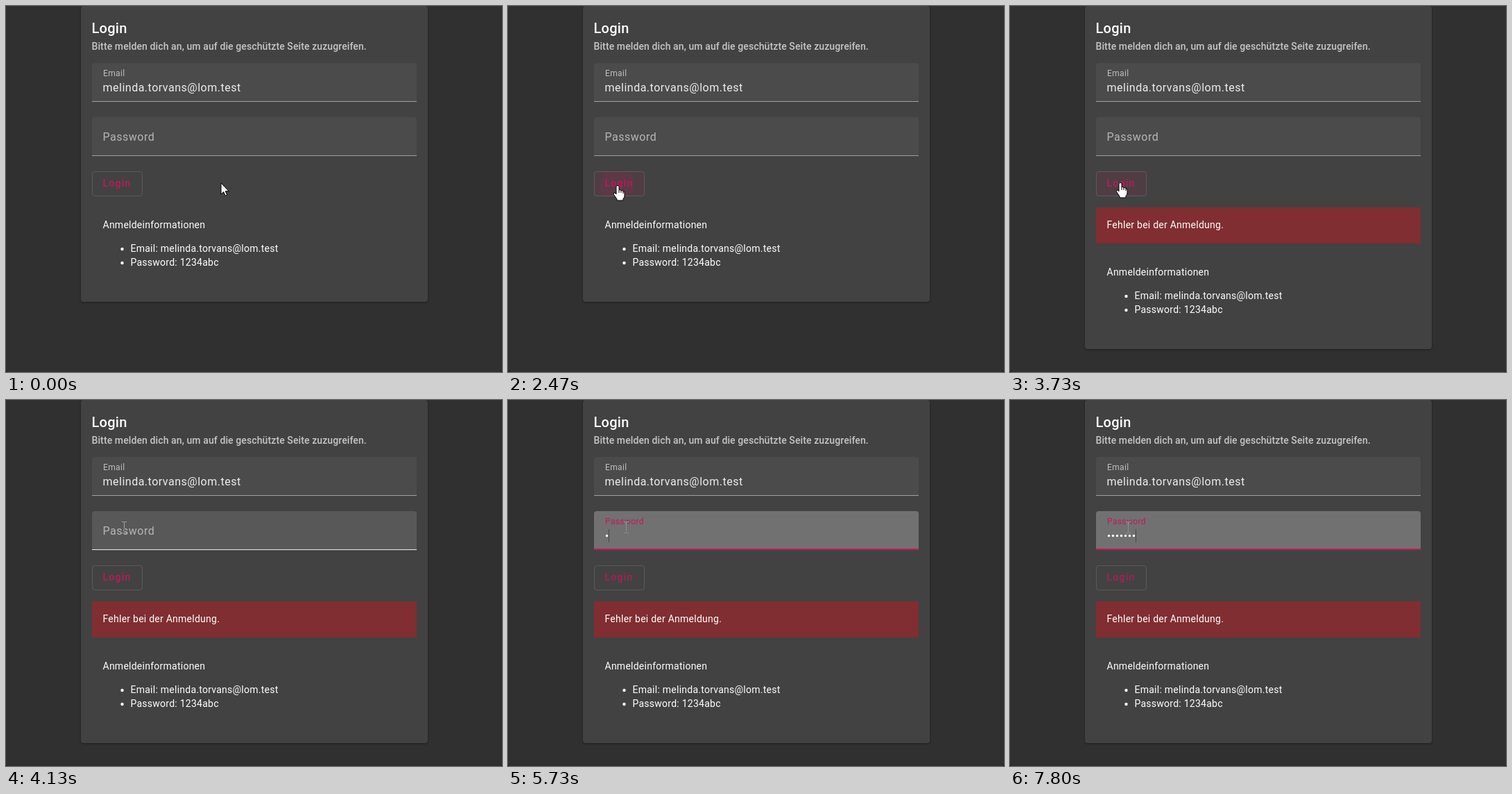
These frames come from a looping animation (715 px wide and 527 px high, 8000 ms). An HTML page with a canvas:

```html
<!DOCTYPE html>
<html lang="de">
<head>
<meta charset="utf-8">
<title>Login</title>
<style>
  html, body { margin: 0; width: 100%; height: 100%; overflow: hidden; background: #303030; }
  canvas { display: block; }
</style>
</head>
<body>
<canvas id="stage" width="715" height="527"></canvas>
<script>
const ctx = document.getElementById('stage').getContext('2d', { alpha: false });
const LOOP = 8000;
const EMAIL = 'melinda.torvans@lom.test';
const PINK = '#c2185b';
const KEY_TIMES = [5730, 5930, 6130, 6400, 7000, 7470, 7800];
const FIELD_X = 124, FIELD_W = 468;

const ARROW = new Path2D('M0 0V16L3.7 12.6L6.2 18.2L8.7 17.1L6.3 11.7H11.3Z');
const HAND = new Path2D('M-2 1.5Q0-1 2 1.5V7Q4 5.5 5 8Q7 6.5 8 9Q10 8 10 11V15Q10 18 8 19.5V22H-1V20L-5.5 13.5Q-6.5 10.5-4 11L-2 13Z');
const KNUCKLES = new Path2D('M2 7V11M5 8V11M8 9V12');

const clamp = v => Math.max(0, Math.min(1, v));
const ease = v => { v = clamp(v); return v * v * (3 - 2 * v); };
const lerp = (a, b, p) => a + (b - a) * p;
const white = alpha => `rgba(255,255,255,${alpha})`;

function rect(x, y, w, h, color) {
  ctx.fillStyle = color;
  ctx.fillRect(x, y, w, h);
}

function rounded(x, y, w, h, radii) {
  ctx.beginPath();
  ctx.roundRect(x, y, w, h, radii);
}

function dot(x, y, r, color) {
  ctx.fillStyle = color;
  ctx.beginPath();
  ctx.arc(x, y, r, 0, Math.PI * 2);
  ctx.fill();
}

function text(str, x, y, size, { color = '#fff', weight = 400, spacing = 0.25 } = {}) {
  ctx.font = `${weight} ${size}px Roboto, sans-serif`;
  ctx.letterSpacing = spacing + 'px';
  ctx.fillStyle = color;
  ctx.fillText(str, x, y);
}

// The picture advances at 15 steps per second.
const stepTime = t => Math.round(Math.floor((t + 5) * 0.015) / 0.015 / 10) * 10;

function pointerAt(t) {
  const toButton = ease((t - 663) / 537);
  const toField = ease((t - 3663) / 467);
  const x = lerp(lerp(310, 158, toButton), 170, toField);
  const y = lerp(lerp(254.5, 258, toButton), 183, toField);
  const onButton = x >= 124 && x < 197 && y >= 238 && y < 274;
  const onField = y >= 160 && y < 216;
  return { x: Math.round(x), y: Math.round(y), onButton, onField };
}

function drawCard(height) {
  ctx.save();
  ctx.shadowColor = 'rgba(0,0,0,.4)';
  ctx.shadowBlur = 3;
  ctx.shadowOffsetY = 1;
  ctx.fillStyle = '#424242';
  rounded(108, 0, 500, height, 4);
  ctx.fill();
  ctx.restore();
  text('Login', 123.5, 39, 20, { weight: 500 });
  text('Bitte melden dich an, um auf die geschützte Seite zuzugreifen.', 123.5, 63, 14,
    { weight: 500, color: white(0.7), spacing: 0.1 });
}

function drawFieldBox(y, fill, line) {
  ctx.fillStyle = fill;
  rounded(FIELD_X, y, FIELD_W, 56, [4, 4, 0, 0]);
  ctx.fill();
  rect(FIELD_X, y + 55, FIELD_W, 1, line);
}

function drawEmailField() {
  drawFieldBox(82, '#4b4b4b', '#a0a0a0');
  text('Email', 140, 101, 12, { color: white(0.64), spacing: 0.375 });
  text(EMAIL, 139.5, 123, 16, { color: white(0.9), spacing: 0.5 });
}

function drawPasswordField(t, hover) {
  const focused = t >= 4470;
  const typed = KEY_TIMES.filter(k => t >= k).length;
  const p = ease((t - 4470) / 150);
  drawFieldBox(160, focused ? '#717171' : hover ? '#585858' : '#4b4b4b',
    focused ? '#c4c4c4' : hover ? '#eeeeee' : '#a0a0a0');

  if (p > 0) {
    const left = lerp(170, FIELD_X, p), right = lerp(170, FIELD_X + FIELD_W, p);
    rect(left, 214, right - left, 2, PINK);
  }
  if (focused && !typed) text('Password', 139.5, 201, 16, { color: '#929292', spacing: 0.5 });

  const tint = [[182, 194], [182, 24], [182, 91]].map(([a, b]) => Math.round(lerp(a, b, p)));
  ctx.save();
  ctx.translate(lerp(139.5, 140, p), lerp(194, 179, p));
  ctx.scale(lerp(1, 0.75, p), lerp(1, 0.75, p));
  text('Password', 0, 0, 16,
    { color: `rgb(${tint})`, spacing: 0.5, weight: focused && p === 0 ? 500 : 400 });
  ctx.restore();

  for (let i = 0; i < typed; i++) dot(142.5 + 6 * i, 195.5, 1.7, '#fff');

  if (typed) {
    const blinkOff = t >= 6930 && t < 7000;
    if (!blinkOff) rect(139 + 6 * typed, 186, 1, 19, '#4c484a');
  } else if (focused && (t < 5000 || t >= 5530)) {
    rect(140, 187, 1, 19, PINK);
  }
}

function drawButton(t, hover) {
  ctx.save();
  rounded(124, 238, 73, 36, 4);
  ctx.clip();
  if (hover) rect(124, 238, 73, 36, 'rgba(194,24,91,.1)');
  text('Login', 139.5, 260, 14,
    { weight: 500, spacing: 1.25, color: t >= 4470 ? '#ab1f57' : PINK });
  if (t >= 2470 && t < 2870) {
    const grow = 1 - (1 - clamp((t - 2420) / 225)) ** 3;
    const alpha = 0.1 * (1 - clamp((t - 2600) / 270));
    dot(157, 258, 48 * grow, `rgba(194,24,91,${alpha})`);
  }
  ctx.restore();
  ctx.strokeStyle = white(0.13);
  ctx.lineWidth = 1;
  rounded(124.5, 238.5, 72, 35, 3.5);
  ctx.stroke();
}

function drawInfo(shift) {
  text('Anmeldeinformationen', 139.5, 320 + shift, 14);
  ['Email: ' + EMAIL, 'Password: 1234abc'].forEach((line, i) => {
    const y = 354 + shift + 20 * i;
    dot(167.5, y - 4, 2.2, '#fff');
    text(line, 179.5, y, 14);
  });
}

function drawPointer({ x, y, onButton, onField }) {
  ctx.save();
  if (onField) {
    ctx.globalCompositeOperation = 'difference';
    rect(x, y - 7, 1, 15, '#fff');
    for (const edge of [y - 8, y + 8]) {
      rect(x - 3, edge, 3, 1, '#fff');
      rect(x + 1, edge, 3, 1, '#fff');
    }
  } else {
    const shape = onButton ? HAND : ARROW;
    ctx.translate(x, y);
    ctx.fillStyle = '#fff';
    ctx.strokeStyle = '#000';
    ctx.lineWidth = 1;
    ctx.fill(shape);
    ctx.stroke(shape);
    if (onButton) ctx.stroke(KNUCKLES);
  }
  ctx.restore();
}

function draw(t) {
  const failed = t >= 2530;
  const shift = failed ? 68 : 0;
  const pointer = pointerAt(t);

  rect(0, 0, 715, 527, '#1c1c1c');
  ctx.fillStyle = '#303030';
  rounded(0, 0, 715, 527, [0, 0, 4, 4]);
  ctx.fill();

  drawCard(426 + shift);
  drawEmailField();
  drawPasswordField(t, pointer.onField);
  drawButton(t, pointer.onButton);
  if (failed) {
    rect(FIELD_X, 290, FIELD_W, 52, '#802e31');
    text('Fehler bei der Anmeldung.', 139.5, 320, 14);
  }
  drawInfo(shift);
  drawPointer(pointer);
}

function tick() {
  draw(stepTime(performance.now() % LOOP));
  requestAnimationFrame(tick);
}
tick();
</script>
</body>
</html>
```
